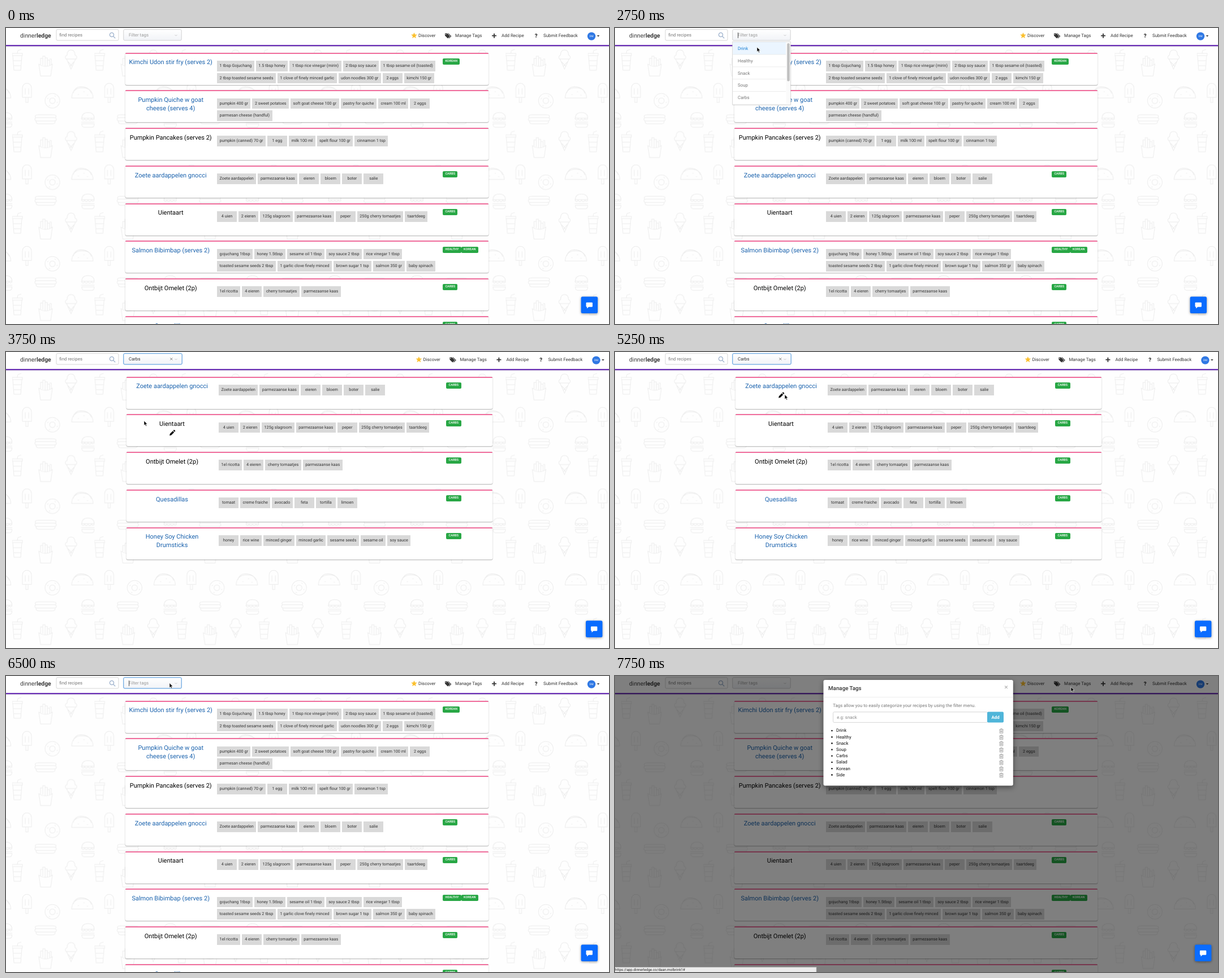
These frames come from a looping animation (1066x525 px, 8000 ms). An HTML page:

```html
<!DOCTYPE html>
<html lang="en">
<head>
<meta charset="utf-8">
<title>Recipe list</title>
<style>
  html, body { margin: 0; width: 100%; height: 100%; overflow: hidden; background: #fefefe; }
  body { position: relative; font-family: Roboto, sans-serif; text-rendering: geometricPrecision; cursor: none; }
  svg { position: absolute; left: 0; top: 0; }
  svg text { white-space: pre; }
  #cards { position: absolute; top: 43.5px; left: 0; width: 1057.6px; }
  #cards.wide { width: 1066px; }
  .card { position: relative; box-sizing: border-box; height: 57px; margin: 0 0 9.75px 19.95%; width: 60.7%;
    background: #fff; border-top: 2px solid #f06d9c; border-radius: 2px;
    box-shadow: 0 .7px 1.6px rgba(0,0,0,.38), 0 0 .6px rgba(0,0,0,.3); }
  .title { position: absolute; top: 7.9px; width: 25%; text-align: center; font-size: 11px; line-height: 15px;
    white-space: nowrap; color: #000; }
  .link { color: #1a62ad; }
  .chips { position: absolute; left: 25.25%; top: 12.4px; }
  .row, .tags { display: flex; white-space: nowrap; }
  .row { gap: 3px; margin-bottom: 3px; }
  .row span { box-sizing: border-box; min-width: 35px; height: 18.8px; padding: 0 4.5px; text-align: center;
    font-size: 7.28px; line-height: 18.8px; color: #333; background: #d9d9d9; }
  .tags { position: absolute; left: 87.4%; top: 8.4px; }
  .tags span { padding: 0 4.4px; font-size: 5.55px; line-height: 11px; font-weight: 500; color: #fff;
    background: #28a745; border-radius: 2px; }
</style>
</head>
<body>
<svg width="1066" height="525">
  <pattern id="doodles" patternUnits="userSpaceOnUse" x="11" y="35" width="145.4" height="144.6"></pattern>
  <rect width="1066" height="525" fill="url(#doodles)"/>
</svg>
<div id="cards"></div>
<svg id="ui" width="1066" height="525" font-size="7.9" fill="#333"></svg>

<script>
const $ = id => document.getElementById(id);
const show = (id, on) => $(id).style.display = on ? '' : 'none';
const move = (id, x, y) => $(id).setAttribute('transform', `translate(${x} ${y})`);

// Small builders for SVG markup; text is placed by its vertical centre.
const text = (x, y, str, attrs = '', size = 7.9) =>
  `<text x="${x}" y="${y + size * .35}" font-size="${size}" ${attrs}>${str}</text>`;
const rect = (x, y, w, h, fill, attrs = '') =>
  `<rect x="${x}" y="${y}" width="${w}" height="${h}" fill="${fill}" ${attrs}/>`;
const path = (d, attrs = '', x = 0, y = 0) => `<path d="${d}" ${attrs} transform="translate(${x} ${y})"/>`;
const line = (color, width = 1) => `fill="none" stroke="${color}" stroke-width="${width}"`;

// Background doodles: x, y, shape
const doodles = [
  [20, 58, 'M-8-9h16l-2 26h-12zM-9-13h18v4h-18zM0-13l1-5 6-2M-7 0h14M-6 9h12'],
  [70, 68, 'M-12-4q12 8 24 0l-3 21h-18zM-9-3v-11h4v12M-5-12v-6h4v18M-1-15h4v15M3-11h4v10M7-13h3v10'],
  [115, 56, 'M-8-1l8 18 8-18zM-9-1q-3-5 2-7 0-9 7-9t7 9q5 2 2 7zM-5 4l7 8M5 4l-7 8'],
  [37, 115, 'M-8 8v-17a8 8 0 0 1 16 0v17zM-2 8v9h4v-9M-3 3v-11M3 3v-11'],
  [135, 115, 'M-19 9q1-18 19-18t19 18zM-16 0q2-10 13-11 15 0 19 12M-8 3h2M2-2h2M8 4h2'],
  [82, 129, 'M-13 0a13 13 0 1 1 26 0a13 13 0 1 1-26 0M-5 0a5 5 0 1 1 10 0a5 5 0 1 1-10 0M-9-3l2-2M4-9l2 2M8 4l1-2M-6 8l2 1'],
  [145, 163, 'M-11-3q0-10 11-10t11 10zM-12-3q3 6 6 1 3 5 6 0 3 5 6 0 3 4 6-1M-12 4h24M-11 7h22q0 6-4 6h-14q-4 0-4-6z'],
  [70, 162, 'M-17-2q-4-6 4-6h26q8 0 4 6M-19 0q0-3 4-3h30q4 0 4 3t-4 3h-30q-4 0-4-3M-17 3q0 5 5 5h24q5 0 5-5'],
];
$('doodles').innerHTML = doodles.map(([x, y, d]) => path(d, line('#ececec'), x - 11, y - 35)).join('');

// Title (* marks a link), chip rows, tags
const recipes = [
  ['*Kimchi Udon stir fry (serves 2)', '1 tbsp Gojuchang,1.5 tbsp honey,1 tbsp rice vinegar (mirin),2 tbsp soy sauce,1 tbsp sesame oil (toasted)|2 tbsp toasted sesame seeds,1 clove of finely minced garlic,udon noodles 300 gr,2 eggs,kimchi 150 gr', 'KOREAN'],
  ['*Pumpkin Quiche w goat<br>cheese (serves 4)', 'pumpkin 400 gr,2 sweet potatoes,soft goat cheese 100 gr,pastry for quiche,cream 100 ml,2 eggs|parmesan cheese (handful)', ''],
  ['Pumpkin Pancakes (serves 2)', 'pumpkin (canned) 70 gr,1 egg,milk 100 ml,spelt flour 100 gr,cinnamon 1 tsp', ''],
  ['*Zoete aardappelen gnocci', 'Zoete aardappelen,parmezaanse kaas,eieren,bloem,boter,salie', 'CARBS'],
  ['Uientaart', '4 uien,2 eieren,125g slagroom,parmezaanse kaas,peper,250g cherry tomaatjes,taartdeeg', 'CARBS'],
  ['*Salmon Bibimbap (serves 2)', 'gojuchang 1tbsp,honey 1.5tbsp,sesame oil 1 tbsp,soy sauce 2 tbsp,rice vinegar 1 tbsp|toasted sesame seeds 2 tbsp,1 garlic clove finely minced,brown sugar 1 tsp,salmon 350 gr,baby spinach', 'HEALTHY,KOREAN'],
  ['Ontbijt Omelet (2p)', '1el ricotta,4 eieren,cherry tomaatjes,parmezaanse kaas', 'CARBS'],
  ['*Quesadillas', 'tomaat,creme fraiche,avocado,feta,tortilla,limoen', 'CARBS'],
  ['*Honey Soy Chicken<br>Drumsticks', 'honey,rice wine,minced ginger,minced garlic,sesame seeds,sesame oil,soy sauce', 'CARBS'],
];
const spans = list => list && list.split(',').map(s => `<span>${s}</span>`).join('');
$('cards').innerHTML = recipes.map(([title, chips, tags]) => `
  <div class="card" data-tags="${tags}">
    <div class="title ${title[0] === '*' ? 'link' : ''}">${title.replace('*', '')}</div>
    <div class="chips">${chips.split('|').map(r => `<div class="row">${spans(r)}</div>`).join('')}</div>
    <div class="tags">${spans(tags)}</div>
  </div>`).join('');
const cards = [...document.querySelectorAll('.card')];

const tagNames = ['Drink', 'Healthy', 'Snack', 'Soup', 'Carbs', 'Salad', 'Korean', 'Side'];
const star = Array.from({ length: 10 }, (_, i) => {
  const r = i % 2 ? 2.5 : 5.6, a = i * Math.PI / 5;
  return `${(r * Math.sin(a)).toFixed(2)},${(-r * Math.cos(a)).toFixed(2)}`;
}).join(' ');
const trash = 'M0 2h7.4M2.4 2v-1.4h2.6v1.4M.9 2v6.4h5.6v-6.4M2.6 3.6v3.4M3.7 3.6v3.4M4.8 3.6v3.4';

const header = `
  ${rect(0, 32, 1066, 1.6, '#000', 'opacity=".08"')}
  ${rect(0, 0, 1066, 31, '#fff')}${rect(0, 30, 1066, 2.3, '#6a2fb5')}
  ${text(25, 13, 'dinner<tspan font-weight="700">ledge</tspan>', 'fill="#3a3a3a"', 10.4)}
  ${rect(89, 2.7, 110, 19.3, '#fff', 'rx="2" stroke="#ccc" stroke-width=".8"')}
  ${text(94.3, 12.6, 'find recipes', 'fill="#777"')}
  ${path('M3.6 0a3.6 3.6 0 1 1-7.2 0a3.6 3.6 0 1 1 7.2 0M2.6 2.6l3.6 3.6', line('#9db1cc', 1.3), 187, 12)}
  <linearGradient id="fade" x2="0" y2="1"><stop stop-color="#fff"/><stop offset="1" stop-color="#f1f3f7"/></linearGradient>
  ${rect(207.8, 2.7, 102.4, 19.3, 'url(#fade)', 'id="select" rx="2" stroke-width=".9"')}
  <g id="placeholder">${text(217, 12.6, 'Filter tags', 'fill="#999"')}</g>
  <g id="value">${text(217, 12.6, 'Carbs')}${path('M-2-2l4 4M2-2l-4 4', line('#666', .9), 292.3, 12.4)}</g>
  ${path('M-2-1l2 2 2-2', line('#bbb', .8), 300.5, 13)}
  ${rect(217, 8, .8, 10, '#333', 'id="caret"')}
  <g id="nav">
    ${rect(768, 0, 81.5, 27.5, '#dedede', 'id="hover"')}
    <polygon points="${star}" fill="#fbc02d" transform="translate(721.5 13.6)"/>
    ${text(729, 13.6, 'Discover')}
    ${path('M-5-4h4l5 5-4 4-5-5zM0-4h1.4l5 5-4 4-.8-.8 3.2-3.2z', '', 781, 13.6)}
    <circle cx="777.6" cy="11.2" r=".8" fill="#fff"/>
    ${text(794, 13.6, 'Manage Tags')}
    ${path('M-4 0h8M0-4v8', line('#333', 1.8), 863, 13.7)}
    ${text(876, 13.6, 'Add Recipe')}
    ${text(934.8, 13.8, '?', 'font-weight="800"', 9.6)}
    ${text(950, 13.6, 'Submit Feedback')}
    <circle cx="1035" cy="14.6" r="7.2" fill="#2f78e4"/>
    ${text(1035, 14.7, 'DM', 'fill="#fff" text-anchor="middle"', 4.6)}
    ${path('M-2.3-1.1h4.6l-2.3 2.3z', '', 1047, 14.2)}
  </g>`;

const menu = `<g id="menu">
  ${rect(207, 24.5, 104.4, 113, '#000', 'opacity=".07" rx="2"')}
  ${rect(207.8, 24.2, 102.4, 111.8, '#fff', 'stroke="#ccc" stroke-width=".7"')}
  ${rect(208.2, 0, 94, 22, '#ebf5ff', 'id="option"')}
  ${tagNames.slice(0, 5).map((name, i) =>
    text(217, 36 + i * 21.9, name, 'class="option"') +
    (i ? rect(208.2, 24.8 + i * 21.9, 94, .6, '#e0e0e0') : '')).join('')}
  ${rect(302.4, 25, 7.6, 110.5, '#fafafa')}${rect(304.2, 27, 4.6, 67.5, '#c1c1c1', 'rx="2.3"')}
</g>`;

const modal = `<g id="modal">
  ${rect(0, 0, 1066, 525, '#000', 'opacity=".5"')}
  <g style="filter:drop-shadow(0 3px 5px rgba(0,0,0,.45))">${rect(368.5, 7, 335.3, 187.5, '#fff', 'rx="3"')}</g>
  ${text(377, 22, 'Manage Tags', 'font-weight="500"', 9.8)}
  ${path('M-2.3-2.3l4.6 4.6M2.3-2.3l-4.6 4.6', line('#b5b5b5', 1.2), 691.5, 19.8)}
  ${rect(368.5, 37.4, 335.3, .7, '#e5e5e5')}
  ${text(385.3, 52, 'Tags allow you to easily categorize your recipes by using the filter menu.', 'fill="#777"')}
  ${rect(385.6, 63.8, 273, 18.6, '#fff', 'rx="2" stroke="#ccc" stroke-width=".8"')}
  ${text(392.3, 73, 'e.g: snack', 'fill="#888"')}
  ${rect(658, 63.4, 29, 19.2, '#4fb5d9', 'rx="2"')}
  ${text(672.5, 73, 'Add', 'fill="#fff" font-weight="700" text-anchor="middle"')}
  ${tagNames.map((name, i) => {
    const y = 96.6 + i * 11.2;
    return `<circle cx="383.5" cy="${y + .4}" r="1.3" fill="#111"/>` + text(391, y, name, 'fill="#111"') +
      path(trash, line('#999', .8), 679.3, y - 3.6);
  }).join('')}
</g>`;

$('ui').innerHTML = header + menu +
  `<g id="pencil">${path('M-4.5 4.5l.8-3.2 5-5 2.4 2.4-5 5zM2-4.4l1-1q.6-.5 1.2 0l1.2 1.2q.5.6 0 1.2l-1 1z', 'fill="#111"')}</g>` +
  modal + `
  <g id="status">
    ${rect(-1, 516.6, 357, 10, '#ececec', 'stroke="#b5b5b5" stroke-width=".7"')}
    ${text(0, 521, 'https://app.dinnerledge.co/daan.molbrink1#', 'fill="#222"', 6.3)}
  </g>
  <g id="chat">
    <g style="filter:drop-shadow(0 1px 2px rgba(0,0,0,.4))">${rect(1016.6, 476.6, 29.4, 29.4, '#0a6cff', 'rx="2.5"')}</g>
    ${path('M-4.5-5h9q1.2 0 1.2 1.2v5.6q0 1.2-1.2 1.2h-5.6l-3 2.6v-2.6q-1.6 0-1.6-1.2v-5.6q0-1.2 1.2-1.2z', 'fill="#fff"', 1031.2, 491.8)}
  </g>
  <g id="cursor">${path('M0 0v8.2l1.9-1.7 1.4 3 1.4-.6-1.4-3h2.6z', 'fill="#000" stroke="#fff" stroke-width=".6"')}</g>`;
const options = [...document.querySelectorAll('.option')];

// Pointer stops: time, x, y
const stops = [
  [500, 384, 51], [750, 290, 40], [1000, 200, 30], [1250, 167, 21], [1500, 249.5, 22.5], [1750, 252, 14],
  [2750, 251, 34], [3000, 248, 62], [3250, 245, 98], [3500, 244, 122],
  [4000, 400, 180], [4250, 730, 271], [4750, 500, 190], [5000, 250, 126], [5250, 300, 75.5],
  [5500, 293, 36], [5750, 291, 10], [6250, 289, 12.5],
  [6750, 480, 17], [7000, 785, 21], [7250, 806, 19.5],
];

function render(t) {
  const within = (a, b) => t >= a && t < b;
  const open = within(2500, 3750), filtered = within(3750, 6000), refocused = within(6000, 7500);
  const dialog = t >= 7750;
  const shift = filtered ? 8.4 : 0;
  const [, x, y] = stops.findLast(s => s[0] <= t) || stops[0];

  $('cards').className = filtered ? 'wide' : '';
  cards.forEach(c => c.style.display = filtered && c.dataset.tags !== 'CARBS' ? 'none' : '');
  move('nav', shift, 0);
  move('chat', filtered || dialog ? 8.4 : 0, 0);

  $('select').setAttribute('stroke', filtered || refocused ? '#2f86d6' : '#ccc');
  $('select').setAttribute('width', filtered ? 103.4 : 102.4);
  show('placeholder', !filtered);
  show('value', filtered);
  show('caret', (open || refocused) && t % 1000 >= 500);

  show('menu', open);
  const active = Math.max(0, Math.floor((y - 25) / 21.9));
  $('option').setAttribute('y', 25 + active * 21.9);
  options.forEach((o, i) => o.setAttribute('fill', i === active ? '#1a7fd4' : '#777'));

  const row = Math.floor((y - 43.5) / 66.75);
  show('pencil', filtered && row >= 0 && x < 374);
  move('pencil', 293.6, 77 + row * 66.75);

  show('hover', within(7000, 7750));
  show('status', t >= 7000);
  show('modal', dialog);
  show('cursor', t >= 500);
  move('cursor', x, y);
}

function frame() {
  render(performance.now() % 8000);
  requestAnimationFrame(frame);
}
frame();
</script>
</body>
</html>
```
